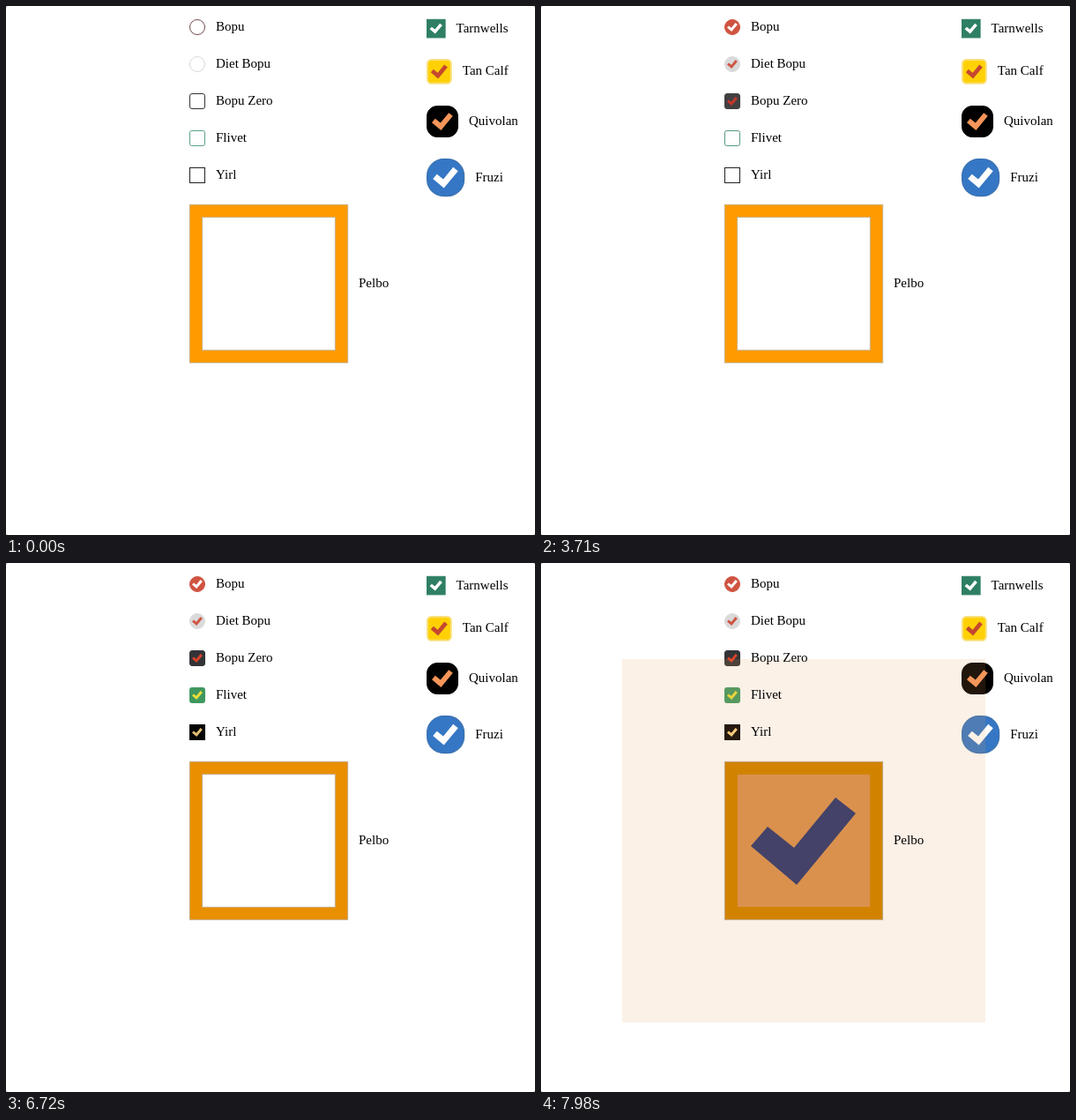
Animation of 600x600 px, one loop 8000 ms. Source, as an HTML page:

```html
<!DOCTYPE html>
<html lang="en">
<head>
<meta charset="utf-8">
<title>Checkboxes</title>
<style>
html, body { margin: 0; width: 100%; height: 100%; overflow: hidden; background: #aaa; }
svg { display: block; width: 100vw; height: 100vh; }
text { font: 15px "Liberation Serif", Times, serif; fill: #000; }
</style>
</head>
<body>
<svg id="stage" viewBox="0 0 600 600"><rect width="600" height="600" rx="2.5" fill="#fff"/></svg>
<script>
const LOOP = 8000, STEP = 70;
const stage = document.getElementById('stage');
const CHECK = 'M30 96L49 74L79 98L126 41L149 59L82 140Z'; // drawn on a 180 unit box

function add(tag, attrs, text) {
  const el = document.createElementNS('http://www.w3.org/2000/svg', tag);
  set(el, attrs);
  if (text) el.textContent = text;
  stage.appendChild(el);
  return el;
}

function set(el, attrs) {
  for (const k in attrs) el.setAttribute(k, attrs[k]);
}

const ramp = (t, from, length) => Math.min(1, Math.max(0, (t - from) / length));
const rgb = hex => [1, 3, 5].map(i => parseInt(hex.slice(i, i + 2), 16));

function mix(a, b, k) {
  const p = rgb(a), q = rgb(b);
  return '#' + p.map((v, i) => Math.round(v + (q[i] - v) * k).toString(16).padStart(2, '0')).join('');
}

function square(x, y, size, inset, radius) {
  const side = size - 2 * inset;
  return { x: x + inset, y: y + inset, width: side, height: side, rx: Math.max(0, radius - inset) };
}

function tick(x, y, size, fill) {
  return add('path', { d: CHECK, fill, transform: `translate(${x} ${y}) scale(${size / 180})` });
}

const labels = [];
const label = (x, y, size, name) => labels.push([x + size + 12, y + size / 2 + 4, name]);

// Right column: always ticked
const fixed = [
  { name: 'Tarnwells', y: 14.8, size: 21.6, r: 0, fill: '#2e7f64', line: '#2e7f64', w: 1, mark: '#ffffff' },
  { name: 'Tan Calf', y: 60, size: 28.8, r: 5.5, fill: '#ffd105', line: '#f9e07a', w: 2, mark: '#c5482f' },
  { name: 'Quivolan', y: 113, size: 36, r: 12, fill: '#000000', line: '#000000', w: 1, mark: '#f5955a' },
  { name: 'Fruzi', y: 173, size: 43.2, r: 19.5, fill: '#3577c4', line: '#3a70b0', w: 1.2, mark: '#ffffff' }
];
for (const b of fixed) {
  add('rect', { ...square(477, b.y, b.size, b.w / 2, b.r), fill: b.fill, stroke: b.line, 'stroke-width': b.w });
  tick(477, b.y, b.size, b.mark);
  label(477, b.y, b.size, b.name);
}

// Left column: each box is ticked at its own moment; pairs are [normal, hovered]
const boxes = [
  { name: 'Bopu', at: 420, r: 9, line: ['#8f585e', '#75484d'], fill: ['#cf5441', '#aa4535'], mark: ['#ffffff', '#d8d4d4'] },
  { name: 'Diet Bopu', at: 1485, r: 9, line: ['#d8d8d8', '#b4b4b4'], fill: ['#dadada', '#c0c0c0'], mark: ['#cf5744', '#c86a62'], wave: '#bdbdbd' },
  { name: 'Bopu Zero', at: 3150, r: 3, line: ['#333333', '#3a3a3a'], fill: ['#333437', '#4a4547'], mark: ['#d8432a', '#bd3228'] },
  { name: 'Flivet', at: 4690, r: 2.6, line: ['#5a9f85', '#4a826d'], fill: ['#3f9860', '#347c4e'], mark: ['#ecdc3a', '#c8b632'], wave: '#327a4b' },
  { name: 'Yirl', at: 6160, r: 0, line: ['#222222', '#1c1c1c'], fill: ['#050403', '#050403'], mark: ['#fbd480', '#d6b26a'] },
  { name: 'Pelbo', at: 7630, r: 0, size: 180, w: 15, line: ['#ff9b00', '#d18300'], fill: ['#da914e', '#da914e'], mark: ['#444268', '#444268'], wave: '#eb9a55' }
];

boxes.forEach((b, i) => {
  b.x = 208;
  b.y = 15 + 42 * i;
  b.size = b.size || 18;
  b.w = b.w || 1;
  if (b.wave) b.ripple = add('rect', { fill: b.wave });
  const inner = square(b.x, b.y, b.size, b.w / 2, b.r);
  b.body = add('rect', { ...inner });
  b.edge = add('rect', { ...inner, fill: 'none', 'stroke-width': b.w });
  b.tick = tick(b.x, b.y, b.size, b.mark[0]);
  if (b.size > 100) {
    const thin = { fill: 'none', stroke: '#bcbcbc', 'stroke-opacity': 0.8 };
    add('rect', { ...square(b.x, b.y, b.size, 0.3, 0), ...thin });
    b.rim = add('rect', { ...square(b.x, b.y, b.size, b.w - 0.3, 0), ...thin });
  }
  label(b.x, b.y, b.size, b.name);
});
labels.forEach(([x, y, name]) => add('text', { x, y }, name));

function drawRipple(b, t) {
  const u = ramp(t, b.at + 70, 447);
  const k = 1 - (1 - u) ** 2;
  const grow = 1.5 * k;
  const spread = b.size * grow / 2;
  set(b.ripple, {
    ...square(b.x, b.y, b.size, -spread, 0),
    rx: b.r * (1 + grow),
    opacity: t < b.at + 70 ? 0 : 1 - k
  });
}

function draw(t) {
  for (const b of boxes) {
    const hover = ramp(t, b.at - 1050, 290) - ramp(t, b.at + 450, 350);
    const on = ramp(t, b.at, b.wave ? 70 : 210);
    const shown = ramp(t, b.at + 70, 210);
    const big = b.size > 100;
    const line = mix(b.line[0], b.line[1], hover);
    const fill = big ? mix('#d18300', b.fill[0], shown) : mix(b.fill[0], b.fill[1], hover);

    set(b.body, { fill, opacity: on });
    set(b.edge, { stroke: big ? line : mix(line, fill, on) });
    set(b.tick, { fill: mix(b.mark[0], b.mark[1], hover), opacity: shown });
    if (b.rim) b.rim.setAttribute('opacity', 1 - on);
    if (b.ripple) drawRipple(b, t);
  }
}

function frame() {
  const t = performance.now() % LOOP;
  draw(Math.floor(t / STEP) * STEP);
  requestAnimationFrame(frame);
}
frame();
</script>
</body>
</html>
```
